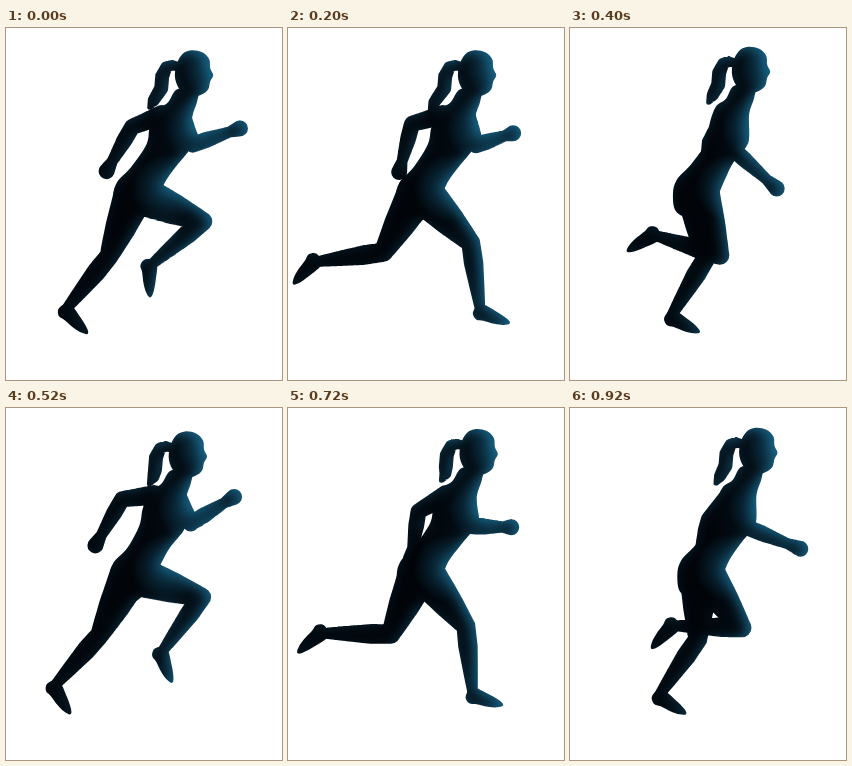
Write an HTML page with a canvas that moves like this. It is 276 by 352 pixels and loops after 1000 ms.

```html
<!DOCTYPE html>
<html lang="en">
<head>
<meta charset="utf-8">
<title>Runner</title>
<style>
html, body { margin: 0; width: 100%; height: 100%; overflow: hidden; background: #fff; }
canvas { display: block; width: 100vw; height: 100vh; }
</style>
</head>
<body>
<canvas id="stage" width="276" height="352"></canvas>
<script>
const W = 276, H = 352, LOOP = 1000, STEPS = 15;
const ctx = document.getElementById('stage').getContext('2d');
const layer = () => Object.assign(document.createElement('canvas'), { width: W, height: H }).getContext('2d');
const body = layer(), rim = layer();

// Joint angles in degrees from straight down, forward positive, evenly spaced over
// one stride. Both sides share them, half a stride apart.
const THIGH = [67, 68, 44, 28, 9, -22, -30, -30, -8, 18];
const SHIN = [-50, -14, 8, -8, -31, -39, -50, -82, -104, -107];
const FOOT = [-3, 50, 64, 70, 58, 39, -2, -47, -59, -62];
const UPPER = [22, 32, 19, -5, -30, -68, -104, -74, -28, 0];
const FORE = [109, 133, 108, 43, -5, -30, -23, -15, 8, 48];
const REACH = [50, 54, 39, 42, 36, 51, 55, 50, 46, 62]; // forearm length as seen

// Waist-down points move with the hips, the rest with the chest.
const BACK = [[171, 57], [163, 70], [153, 78], [147, 95], [145, 112]];
const HIPS = [[128, 136], [114, 151], [110, 166], [114, 184], [135, 190], [152, 172], [162, 151]];
const FRONT = [[170, 134], [183, 118], [186, 108], [186, 85], [191, 69], [191, 57]];
const HEAD = [[185, 18], [196, 20], [203, 27], [204, 36], [207, 43], [204, 49], [202, 57],
  [196, 62], [187, 64], [175, 59], [169, 47], [170, 33], [176, 22]];

const wave = (step, peak, n = 1) => Math.cos(2 * Math.PI * n * (step - peak) / STEPS);
const moved = (pts, dx, dy) => pts.map(([x, y, r]) => [x + dx, y + dy, r]);

// Smooth cyclic curve through evenly spaced keys.
function curve(keys, step) {
  const n = keys.length, f = step / STEPS * n, k = Math.floor(f), u = f - k;
  const [a, b, c, d] = [-1, 0, 1, 2].map(j => keys[(k + j + n) % n]);
  return b + u / 2 * (c - a + u * (2 * a - 5 * b + 4 * c - d + u * (3 * (b - c) + d - a)));
}

function reach([x, y], angle, len) {
  const a = angle * Math.PI / 180;
  return [x + len * Math.sin(a), y + len * Math.cos(a)];
}

const between = (a, b, u, r) => [a[0] + (b[0] - a[0]) * u, a[1] + (b[1] - a[1]) * u, r];

// Closed smooth shape.
function blob(g, pts) {
  const n = pts.length, p = i => pts[(i + n) % n];
  g.beginPath();
  g.moveTo(p(0)[0], p(0)[1]);
  for (let i = 0; i < n; i++) {
    const [a, b, c, d] = [p(i - 1), p(i), p(i + 1), p(i + 2)];
    g.bezierCurveTo(b[0] + (c[0] - a[0]) / 6, b[1] + (c[1] - a[1]) / 6,
      c[0] - (d[0] - b[0]) / 6, c[1] - (d[1] - b[1]) / 6, c[0], c[1]);
  }
  g.fill();
}

// Round, tapering tube through [x, y, radius] points.
function tube(g, pts) {
  g.beginPath();
  for (let i = 1; i < pts.length; i++) {
    for (let s = 0; s <= 30; s++) {
      const [x, y, r] = pts[i - 1].map((v, j) => v + (pts[i][j] - v) * s / 30);
      g.moveTo(x + r, y);
      g.arc(x, y, r, 0, 7);
    }
  }
  g.fill();
}

function leg(g, hip, step) {
  const knee = reach(hip, curve(THIGH, step), 65);
  const ankle = reach(knee, curve(SHIN, step), 67);
  tube(g, [[...hip, 20], between(hip, knee, .5, 15.5), [...knee, 9.5],
    between(knee, ankle, .3, 9.8), between(knee, ankle, .7, 7.3), [...ankle, 5.2]]);
  const turn = curve(FOOT, step), len = 32;
  const foot = [[-2, -5], [len * .5, -5], [len - 3, -3], [len + 1, 0], [len - 4, 4],
    [len * .6, 7], [len * .25, 9], [1, 11], [-5, 6]];
  blob(g, foot.map(([u, v]) => reach(reach(ankle, turn, u), turn - 90, v)));
}

function arm(g, shoulder, step) {
  const elbow = reach(shoulder, curve(UPPER, step), 32);
  const fist = reach(elbow, curve(FORE, step), curve(REACH, step));
  tube(g, [[...shoulder, 10], [...elbow, 8], between(elbow, fist, .3, 8),
    between(elbow, fist, .78, 5.5), [...fist, 8]]);
}

function figure(g, step) {
  const other = (step + STEPS / 2) % STEPS;
  const cx = -1 + 4 * wave(step, 14) + 2.7 * wave(step, 3.2, 2);
  const cy = 3.3 + 3.2 * wave(step, 1.5, 2);
  const hx = .6 * cx - 3, hy = .7 * cy;
  const hip = s => [135 + hx + 6 * wave(s, 1.5), 165 + hy];
  const shoulder = s => [165 + cx + 13 * wave(s, 1.8), 87];

  arm(g, shoulder(other), other);
  leg(g, hip(other), other);
  leg(g, hip(step), step);

  // The back broadens while the shoulders are turned.
  const spread = 7 * Math.sqrt((1 + wave(step, 2, 2)) / 2);
  const back = BACK.map(([x, y], i) => [x + cx - spread * i / 4, y + cy]);
  blob(g, [...back, ...moved(HIPS, hx, hy), ...moved(FRONT, cx, cy)]);
  blob(g, moved(HEAD, cx, cy));

  const flick = wave(step, 10), tip = [148 + 5 * flick, 72 - 4 * flick];
  tube(g, moved([[174, 35, 4.5], [166, 33, 5], [160, 35, 6], [156, 44, 7], [155, 56, 7],
    [tip[0] + 2, tip[1] - 6, 6], [tip[0] - 2, tip[1] + 1, 2.5]], cx, cy));
  arm(g, shoulder(step), step);
  return cx;
}

function fade(g, x0, x1, rgb, a0, a1) {
  const f = g.createLinearGradient(x0, 0, x1, 0);
  f.addColorStop(0, `rgba(${rgb},${a0})`);
  f.addColorStop(1, `rgba(${rgb},${a1})`);
  g.fillStyle = f;
  g.fillRect(0, 0, W, H);
}

function glow(x, y, r, alpha) {
  const f = body.createRadialGradient(x, y, 0, x, y, r);
  f.addColorStop(0, `rgba(24,108,146,${alpha})`);
  f.addColorStop(1, 'rgba(24,108,146,0)');
  body.fillStyle = f;
  body.fillRect(0, 0, W, H);
}

function draw(step) {
  body.globalCompositeOperation = 'source-over';
  body.clearRect(0, 0, W, H);
  body.fillStyle = '#01050a';
  const cx = figure(body, step);

  // Light along the edges that face right.
  rim.globalCompositeOperation = 'source-over';
  rim.fillStyle = 'rgb(26,108,146)';
  rim.fillRect(0, 0, W, H);
  rim.globalCompositeOperation = 'destination-out';
  rim.filter = 'blur(6px)';
  rim.drawImage(body.canvas, -4, 2);
  rim.filter = 'none';
  rim.globalCompositeOperation = 'destination-in';
  fade(rim, 90, 175, '0,0,0', .2, .85);

  body.globalCompositeOperation = 'source-atop';
  fade(body, 140, 215, '12,60,84', 0, .3);
  glow(160, 160, 34, .5);
  glow(192 + cx, 100, 34, .55);
  glow(206 + cx, 40, 30, .55);
  body.drawImage(rim.canvas, 0, 0);

  ctx.fillStyle = '#fff';
  ctx.fillRect(0, 0, W, H);
  ctx.drawImage(body.canvas, 0, 0);
}

// Even steps snapped to a 40 ms clock.
const startOf = i => Math.round(i * LOOP / STEPS / 40) * 40;
let shown = -1;
function tick() {
  const t = performance.now() % LOOP;
  let i = STEPS - 1;
  while (startOf(i) > t) i--;
  if (i !== shown) draw(shown = i);
  requestAnimationFrame(tick);
}
tick();
</script>
</body>
</html>
```
